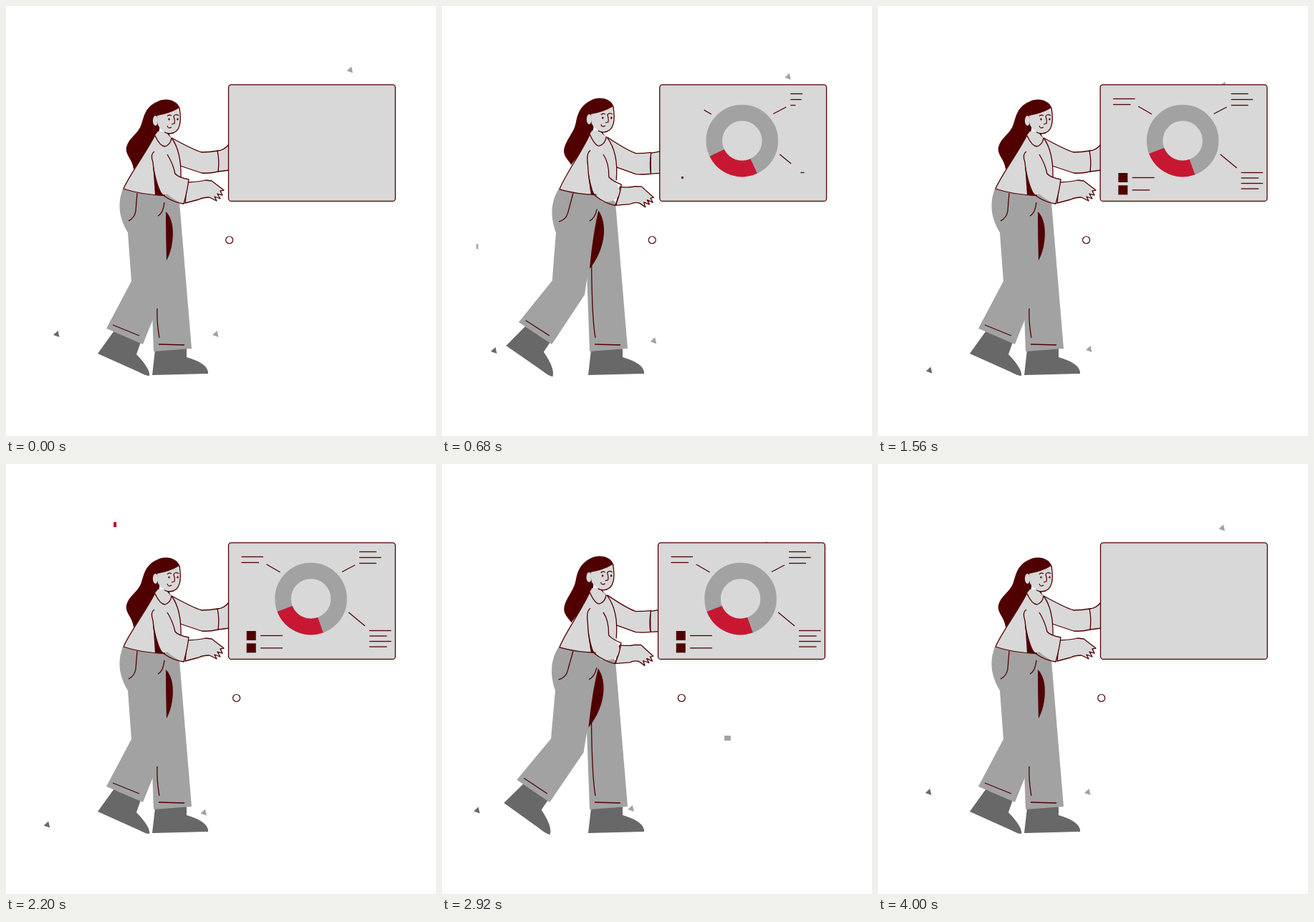
An HTML page with a canvas for the animation above (4.08 s loop, 600 px wide and 600 px high).

```html
<!DOCTYPE html>
<html>
<head>
<meta charset="utf-8">
<style>
html, body { margin: 0; width: 100%; height: 100%; overflow: hidden; background: #fff; }
canvas { display: block; width: 100vmin; height: 100vmin; }
</style>
</head>
<body>
<canvas id="stage" width="600" height="600"></canvas>
<script>
const ctx = document.getElementById('stage').getContext('2d');
const LOOP = 4080;
const DARK = '#500000', RED = '#c81732', GREY = '#a2a2a2', SHOE = '#686868', PALE = '#d8d8d8';

let now = 0;   // time inside the loop, ms
let lean = 0;  // pose: 0 upright, 1 leaning back

const smooth = u => u * u * (3 - 2 * u);
const ease = (start, length) => smooth(Math.min(1, Math.max(0, (now - start) / length)));

// Value at the current time from flat [time, value, ...] keys.
function keyed(keys, curve = u => u) {
  for (let i = 2; i < keys.length; i += 2) {
    if (now <= keys[i]) {
      const u = (now - keys[i - 2]) / (keys[i] - keys[i - 2]);
      return keys[i - 1] + (keys[i + 1] - keys[i - 1]) * curve(u);
    }
  }
  return keys[keys.length - 1];
}

// Path between two poses that share the same commands.
function pose(a, b = a) {
  const ends = b.match(/-?[\d.]+/g);
  let i = 0;
  return new Path2D(a.replace(/-?[\d.]+/g, n => +n + (ends[i++] - n) * lean));
}

function fill(path, color) {
  ctx.fillStyle = color;
  ctx.fill(path);
}

function stroke(path, width = 1.3) {
  ctx.strokeStyle = DARK;
  ctx.lineWidth = width;
  ctx.stroke(path);
}

function outlined(path) {
  fill(path, PALE);
  stroke(path);
}

function line(x1, y1, x2, y2) {
  stroke(new Path2D(`M${x1} ${y1}L${x2} ${y2}`));
}

function triangle(x, y, color) {
  fill(new Path2D(`M${x} ${y + 6}L${x + 6.5} ${y}L${x + 8.5} ${y + 9}Z`), color);
}

// Bar whose head runs ahead of its tail.
function bar(x1, x2, y, color, headStart, tailStart) {
  const head = x1 + (x2 - x1) * ease(headStart, 500);
  const tail = x1 + (x2 - x1) * ease(tailStart, 500);
  ctx.fillStyle = color;
  if (head > tail) ctx.fillRect(tail, y, head - tail, 7);
}

function drawScenery() {
  triangle(
    keyed([0, 66, 1000, 69, 1300, 69, 1560, 67, 1720, 63, 2280, 51, 2600, 45, 2840, 43, 3280, 50, 4000, 66]),
    keyed([0, 453, 1000, 487, 1560, 503.5, 1760, 507.5, 1900, 507, 2600, 487, 3280, 469, 4000, 453]), SHOE);
  const dx = keyed([0, 0, 1000, 4, 1300, 4, 1560, 2, 1760, -4, 2600, -28, 2840, -30, 3280, -23, 4000, 0]);
  const dy = keyed([0, 0, 1560, 21, 2400, 31, 2600, 29, 3280, 16.5, 4000, 0]);
  triangle(475.5 + dx, 84.5 + dy, GREY);
  triangle(288 + dx, 453 + dy, GREY);

  const dot = new Path2D();
  dot.arc(keyed([0, 311.7, 1280, 277, 2600, 341, 4000, 311.7]), 326.5, 5, 0, 7);
  stroke(dot, 1.2);

  bar(48, 185, 332, GREY, 640, 820);
  bar(150, 240, 81, RED, 2135, 2315);
  bar(394, 523, 379, GREY, 2840, 3100);
}

function drawLegs() {
  fill(pose(
    'M151 453L128 485L186 511Q195 516 200 516Q202 507 182 486L188 469Z',
    'M107 445L79 471L127 508Q136 516 142 517.5Q146 506 131 482L141 469Z'), SHOE);
  fill(pose('M208 480L204 515L282 513Q283 499 252 490L252 477Z'), SHOE);
  fill(pose(
    'M163 255C157 272 155 291 170 316L175 384L140 450L191 472L218 405L224 300L215 262Z',
    'M163 255C151 272 149 293 156 316L148 383L98 439L143 472L194 402L201 370L215 262Z'), GREY);
  fill(pose('M200 258L202 370L206 482L259 478L242 274L225 258Z'), GREY);
  fill(pose(
    'M223 287C236 298 236 333 224 355Q223 320 223 287Z',
    'M217 285C229 303 228 338 201 370Q207 318 217 285Z'), DARK);
  stroke(pose('M211 422Q210 440 214 463', 'M208 342Q209 435 214 463'));
  stroke(pose('M149 445L186 460', 'M108 437L140 460'));
  stroke(pose('M213 472L249 473'));
  stroke(pose('M183 261L181 286Q180 295 171 300', 'M183 261L174 290Q171 299 161 301'));
  stroke(pose('M221 274Q219 290 212 293', 'M215 286Q212 298 204 302'));
}

function drawBody() {
  fill(pose(
    'M243 144C240 131 222 127 210 134C195 141 193 152 189 165C185 178 171 184 168 197C166 208 177 214 178 228L212 184L216 160Z',
    'M239 141C236 128 218 125 207 131C193 138 188 149 186 163C184 176 173 188 171 200C169 209 176 215 181 220L209 182L212 158Z'), DARK);

  // far hand and arm
  outlined(pose(
    'M295 202Q304 202 312 192L312 229L296 231Z',
    'M290 206Q298 205 312 203L312 234L290 235Z'));
  outlined(pose(
    'M231 184Q262 201 273 204Q285 204 295 202Q298 215 296 231Q284 234 273 233L240 222Z',
    'M231 183Q258 202 270 206Q282 206 291 205Q287 220 290 235Q280 236 270 235L240 224Z'));

  // torso
  fill(pose(
    'M208 180C197 202 171 238 164 255Q190 264 222 264L243 250L244 220Q240 197 231 184Q229 180 222 175L212 175Z',
    'M206 178C196 202 170 238 164 256Q190 263 215 263L242 250L244 222Q240 197 231 183Q228 178 221 173L209 173Z'), PALE);
  stroke(pose(
    'M208 180C197 202 171 238 164 255Q190 264 222 264',
    'M206 178C196 202 170 238 164 256Q190 263 215 263'));
  stroke(pose(
    'M231 184Q245 203 244 240',
    'M230 183Q247 205 243 244'));
  stroke(pose(
    'M208 181Q215 196 222 196Q230 193 231 184',
    'M206 179Q213 195 219 195Q227 193 229 182'));
  fill(pose('M223 176L227 177Q229 183 232 186Z', 'M219 173L223 174Q225 181 229 184Z'), DARK);

  // near hand and sleeve
  outlined(pose(
    'M253 246Q272 245 278 243L287 244L304 257L299 258L302 264L295 262L299 269L291 266L294 272L284 267Q274 267 269 270L250 275Z',
    'M247 254Q262 256 266 254L276 254L293 270L289 271L292 277L284 273L287 279L279 276L281 283L273 277Q267 275 261 278L241 279Z'));
  fill(pose(
    'M207 203Q201 208 206 224Q213 264 248 276Q253 258 255 242Q240 239 236 234Q233 220 225 207Z',
    'M207 201Q201 205 203 222L208 262Q218 273 240 279Q247 266 249 251Q238 246 232 240Q233 218 225 207Z'), PALE);
  stroke(pose(
    'M207 203Q201 207 205 218Q208 258 222 266Q234 274 248 276Q253 258 255 242Q240 239 236 234Q233 220 225 207',
    'M207 201Q201 205 203 222Q204 254 211 264Q224 275 240 279Q247 266 249 251Q238 246 232 240Q233 218 225 207'));
  fill(pose('M205 218Q207 248 208 264L219 265Q210 250 205 218Z', 'M204 232Q205 252 208 263L211 264Q206 250 204 232Z'), DARK);
}

function drawHead() {
  ctx.save();
  ctx.translate(-4 * lean, -2.5 * lean);
  fill(new Path2D('M211 153Q229 150 242 142C245 160 244 177 229 178Q217 176 212 166Z'), PALE);
  stroke(new Path2D('M242 142C245 160 244 177 229 178Q224 178 221 176'));
  const ear = new Path2D();
  ear.ellipse(208.5, 160, 3.6, 7, 0, 0, 7);
  fill(ear, PALE);
  for (const x of [227.5, 239.5]) {
    const eye = new Path2D();
    eye.ellipse(x, 158, 1.2, 1.6, 0, 0, 7);
    fill(eye, DARK);
  }
  stroke(new Path2D('M225 154Q227 151 231 153M241 153Q236 150 234 154Q236 160 235 164L231 165M225 167Q226 172 231 169'), 1.2);
  ctx.restore();
}

function drawRing() {
  const size = ease(80, 270) * (1 - ease(3480, 340));
  if (size <= 0) return;
  const turn = -70 * (1 - ease(-160, 1000));
  const rad = deg => deg * Math.PI / 180;
  ctx.lineWidth = 22.5 * size;
  const arc = (from, to, color) => {
    ctx.strokeStyle = color;
    ctx.beginPath();
    ctx.arc(115, 188, 39 * size, rad(from), rad(to));
    ctx.stroke();
  };
  arc(0, 360, GREY);
  arc(70 + turn, 159 + turn, RED);
}

// Line that grows from its first point and shrinks back to it.
function growing(x1, y1, x2, y2, start, end = 3160) {
  const g = ease(start, 500) * (1 - ease(end, 500));
  if (g > 0.01) line(x1, y1, x1 + (x2 - x1) * g, y1 + (y2 - y1) * g);
}

function drawChart() {
  drawRing();
  growing(158.5, 150.5, 176.5, 141, 95);
  growing(167.5, 207, 190.5, 226, 365);
  growing(72, 151, 53, 140, 420);

  [24, 30.5, 24].forEach((w, i) => growing(182.5, 122.5 + i * 8, 182.5 + w, 122.5 + i * 8, 360 + i * 70));
  [30.5, 24.5, 30.5, 24.5].forEach((w, i) =>
    growing(196.5, 232.5 + i * 7.5, 196.5 + w, 232.5 + i * 7.5, 550 + i * 155));
  [30.5, 24.5].forEach((w, i) =>
    growing(48.5 - i * 6, 129.5 + i * 8, 48.5 - i * 6 - w, 129.5 + i * 8, 660 + i * 230));

  [0, 1].forEach(i => {
    const y = 239.5 + i * 17.3;
    const side = 13 * ease(560 + i * 320, 400) * (1 - ease(3030, 500));
    ctx.fillStyle = DARK;
    ctx.fillRect(31.7 - side / 2, y - side / 2, side, side);
    growing(44.5, y, 75.5, y, 775 + i * 430, 3030);
  });
}

function drawBoard() {
  const shift = keyed([0, 0, 160, 0, 960, 1, 1640, 0, 2240, 0, 2840, 1, 3440, 0], smooth);
  ctx.save();
  ctx.translate(310.5 - 9.4 * shift, 0);
  const panel = new Path2D();
  panel.roundRect(0, 109.8, 232.8, 162.6, 4);
  outlined(panel);
  drawChart();
  ctx.restore();
}

function frame() {
  // 25 pictures a second, the first of each second held twice
  let step = Math.floor(performance.now() % LOOP / 40);
  if (step % 25 === 1) step--;
  now = step * 40;
  lean = keyed([0, 0, 40, 0, 960, 1.01, 1540, 0, 2200, 0, 2810, 1, 3260, 0], smooth);

  ctx.fillStyle = '#fff';
  ctx.fillRect(0, 0, 600, 600);
  ctx.lineJoin = 'round';
  drawScenery();
  drawLegs();
  drawBody();
  drawHead();
  drawBoard();
  requestAnimationFrame(frame);
}
frame();
</script>
</body>
</html>
```
